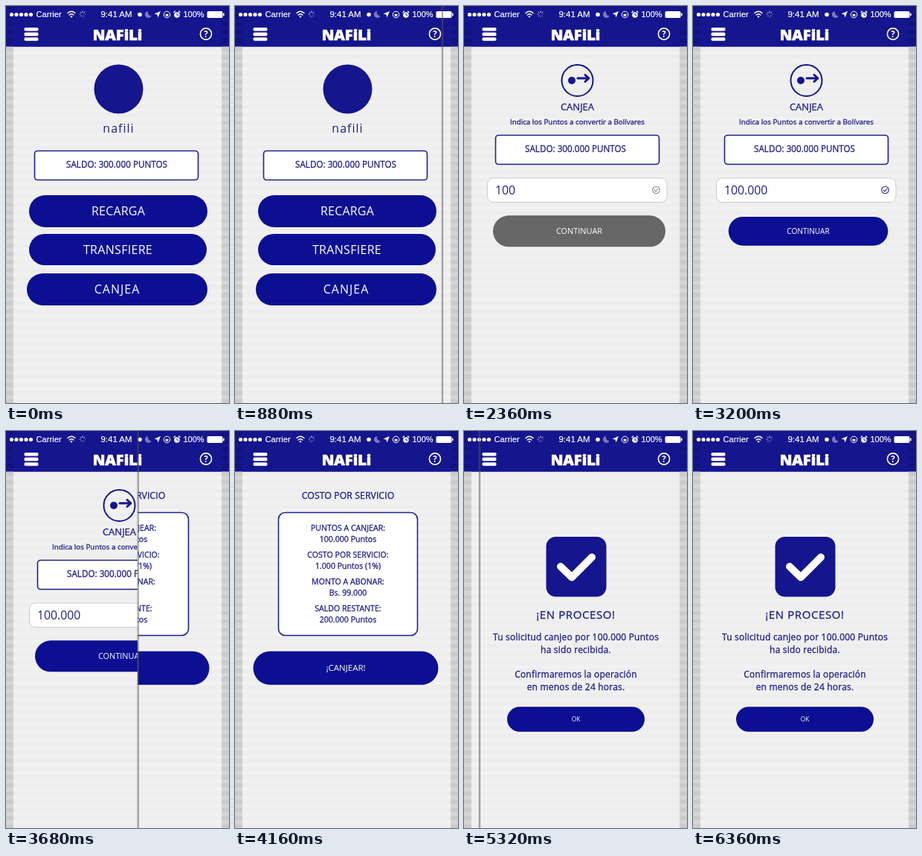
Write an HTML page that moves like this. It is 300 px wide and 533 px high and loops after 6.4 s.

```html
<!DOCTYPE html>
<html lang="es">
<head>
<meta charset="utf-8">
<style>
html, body { margin: 0; width: 100%; height: 100%; overflow: hidden; background: #f0f0f0; }
svg, #edge { position: absolute; left: 0; top: 0; }
text { font-family: "Open Sans", "Noto Sans", sans-serif; font-weight: 500; }
.bold { stroke: #20208a; stroke-width: .3; }
.status { font-family: "Liberation Sans", Arial, sans-serif; stroke: #fff; stroke-width: .2; }
#edge { width: 4px; height: 533px; background: linear-gradient(90deg, #5550, #5555 50%, #555b 75%, #5550); }
</style>
</head>
<body>
<script>
const LOOP = 6400, WIPE = 500, PRESS = 360;
const NAVY = '#15158e', BLUE = '#0c0f92', INK = '#20208a', GREY = '#666';

const text = (s, x, y, size, { fill = INK, gap = 0, anchor = 'middle', extra = '' } = {}) =>
  `<text x="${x}" y="${y}" font-size="${size}" fill="${fill}" letter-spacing="${gap}" text-anchor="${anchor}" ${extra}>${s}</text>`;
const rect = (x, y, w, h, r, fill, extra = '') =>
  `<rect x="${x}" y="${y}" width="${w}" height="${h}" rx="${r}" fill="${fill}" ${extra}/>`;
const circle = (x, y, r, fill, extra = '') =>
  `<circle cx="${x}" cy="${y}" r="${r}" fill="${fill}" ${extra}/>`;
const line = (d, color, width) =>
  `<path d="${d}" fill="none" stroke="${color}" stroke-width="${width}" stroke-linecap="round" stroke-linejoin="round"/>`;
const panel = (x, y, w, h, r) => rect(x, y, w, h, r, '#fff', `stroke="${INK}" stroke-width="1.6"`);
const bold = { extra: 'class="bold"' };

// Buttons are drawn around their own centre so that a press can scale them.
const button = (id, label, x, y, w, h, size, gap = 0) =>
  `<g id="${id}" data-x="${x}" data-y="${y}" transform="translate(${x} ${y})">` +
  rect(-w / 2, -h / 2, w, h, h / 2, BLUE) +
  text(label, 0, size * 0.36, size, { fill: '#fff', gap }) + '</g>';

const svg = (id, body, h = 533) => `<svg id="${id}" width="300" height="${h}">${body}</svg>`;

const stripes = (id, color, band) =>
  `<pattern id="${id}" width="10" height="11" patternUnits="userSpaceOnUse">
    <rect width="10" height="11" fill="${color}"/><rect width="10" height="5.5" fill="${band}"/></pattern>`;
const backdrop = '<defs>' + stripes('side', '#d5d5d5', '#cbcbcb') + stripes('main', '#f1f1f1', '#eee') + '</defs>' +
  rect(0, 0, 300, 533, 0, 'url(#side)') + rect(10, 0, 280, 533, 0, 'url(#main)');

const home = circle(151.5, 111.5, 33, NAVY) +
  text('nafili', 151.5, 170, 16, { gap: 1 }) +
  panel(38.5, 194.5, 220, 39, 4) +
  text('SALDO: 300.000 PUNTOS', 149, 216.5, 11.7, bold) +
  button('recarga', 'RECARGA', 151, 275.5, 240, 43, 16, 0.2) +
  button('transfiere', 'TRANSFIERE', 150.5, 327, 239, 42, 16, 0.3) +
  button('canjea', 'CANJEA', 149.5, 380.5, 243, 43, 16, 1);

const amount = circle(152.5, 100, 21, 'none', `stroke="${NAVY}" stroke-width="2"`) +
  circle(145, 100, 5, NAVY) +
  line('M153 97H167M163 92.5L168 97L163 101.5', NAVY, 3) +
  text('CANJEA', 152.5, 140, 13, bold) +
  text('Indica los Puntos a convertir a Bolívares', 152.5, 158.5, 9.8, bold) +
  panel(42.5, 173.5, 220, 39, 4) +
  text('SALDO: 300.000 PUNTOS', 150, 195.5, 11.7, bold) +
  rect(31.5, 231, 241.5, 32.5, 8, '#fff', 'stroke="#ccc"') +
  text('MONTO', 42, 253.5, 16.7, { fill: '#999', anchor: 'start', extra: 'id="hint" style="font-weight:300"' }) +
  text('', 42, 253, 15.8, { anchor: 'start', extra: 'id="typed"' }) +
  '<g id="tick" fill="none" stroke-width="1.1"><circle cx="258.5" cy="247" r="4.8"/><path d="M256 247l2 2 3.2-3.6"/></g>' +
  button('continuar', 'CONTINUAR', 155, 302.3, 232, 42, 10.9);

const costs = [
  ['PUNTOS A CANJEAR:', 134], ['100.000 Puntos', 149],
  ['COSTO POR SERVICIO:', 170], ['1.000 Puntos (1%)', 185],
  ['MONTO A ABONAR:', 206], ['Bs. 99.000', 220.5],
  ['SALDO RESTANTE:', 241.5], ['200.000 Puntos', 256.5]];
const cost = text('COSTO POR SERVICIO', 152, 91, 12.4, bold) +
  panel(58.5, 109.5, 187, 165, 9) +
  costs.map(([s, y]) => text(s, 152, y, 10.6, bold)).join('') +
  button('canjear', '¡CANJEAR!', 149, 318.3, 249, 45, 11.5);

const notes = [
  ['Tu solicitud canjeo por 100.000 Puntos', 281], ['ha sido recibida.', 297.5],
  ['Confirmaremos la operación', 331], ['en menos de 24 horas.', 347.5]];
const done = rect(110.5, 142, 81, 80.5, 13, NAVY) +
  line('M130 182L145 196.5L172 169.5', '#fff', 10) +
  text('¡EN PROCESO!', 150.5, 252, 15, { gap: 0.6, ...bold }) +
  notes.map(([s, y]) => text(s, 150.5, y, 12, { gap: 0.2, ...bold })).join('') +
  button('ok', 'OK', 150.5, 387, 185, 33.5, 8.3);

const status = (s, x, size, anchor = 'start') =>
  text(s, x, 15.3, size, { fill: '#fff', anchor, extra: 'class="status"' });
const spokes = [...Array(8)].map((_, i) => {
  const a = i * Math.PI / 4, c = Math.cos(a), s = Math.sin(a);
  return `<path d="M${103 + 2 * c} ${11 + 2 * s}L${103 + 4.5 * c} ${11 + 4.5 * s}" stroke="#fff" opacity="${0.25 + i * 0.09}"/>`;
}).join('');
const header = '<defs>' + stripes('rim', '#15158e', '#121280') + '</defs>' +
  rect(0, 0, 300, 54.5, 0, 'url(#rim)') + rect(10, 0, 280, 54.5, 0, NAVY) +
  [7.5, 14, 20.5, 27, 33.5].map(x => circle(x, 11.5, 2.6, '#fff')).join('') +
  status('Carrier', 40.5, 11.2) +
  line('M83 9.5Q88 5 93 9.5M85.2 12Q88 9.5 90.8 12', '#fff', 1.5) + circle(88, 14.3, 1.2, '#fff') +
  spokes +
  status('9:41 AM', 148.5, 11.5, 'middle') +
  circle(180, 11.5, 2.8, '#fff') +
  '<path d="M191 7a4.5 4.5 0 1 0 4.5 6.5a5 5 0 0 1-4.5-6.5" fill="#7777c4"/>' +
  '<path d="M208 7l-3.5 8.5-1-4-4-1z" fill="#fff"/>' +
  circle(216.5, 11.5, 4.3, 'none', 'stroke="#fff"') + rect(214.7, 10.8, 3.6, 3, 0.4, '#fff') +
  circle(230, 12, 3.8, '#fff') + line('M226 8.5l1.5-1.5M234 8.5l-1.5-1.5', '#fff', 1.3) +
  line('M230 10V12.3H232', NAVY, 0.9) +
  status('100%', 238.5, 11) +
  rect(270.5, 7, 21, 9, 1.8, '#fff') + rect(292, 9.5, 1.6, 4, 0.8, '#fff') +
  [29, 35.6, 42.2].map(y => rect(24.5, y, 19, 4.6, 1.8, '#fff')).join('') +
  text('NAFiLi', 150, 45.5, 20, { fill: '#fff', extra: 'style="font-weight:800" stroke="#fff" stroke-width=".7"' }) +
  circle(269, 37.5, 7.6, 'none', 'stroke="#fff" stroke-width="1.6"') +
  text('?', 269, 41.8, 11.5, { fill: '#fff', extra: 'style="font-weight:700"' });

const screens = { home, amount, cost, done };
document.body.innerHTML =
  Object.entries(screens).map(([id, body]) => svg(id, backdrop + body)).join('') +
  svg('header', header, 55) + '<div id="edge"></div>';

const $ = id => document.getElementById(id);
const wipes = [['amount', 795], ['cost', 3460], ['done', 4905]];
const presses = [['canjea', 440], ['continuar', 3125], ['canjear', 4565], ['ok', 5960]];

function draw(t) {
  let edge = -10;
  for (const [id, start] of wipes) {
    const p = Math.min(1, Math.max(0, (t - start) / WIPE));
    const x = 150 * (1 + Math.cos(Math.PI * p));
    $(id).style.clipPath = `inset(0 0 0 ${x}px)`;
    if (p > 0 && p < 1) edge = x;
  }
  $('edge').style.transform = `translateX(${edge - 2}px)`;

  for (const [id, start] of presses) {
    const p = Math.min(1, Math.max(0, (t - start) / PRESS));
    const { x, y } = $(id).dataset;
    $(id).setAttribute('transform', `translate(${x} ${y}) scale(${1 - 0.122 * Math.sin(Math.PI * p)})`);
  }

  const count = Math.max(0, Math.floor((t - 2020) / 90));
  $('typed').textContent = '100.000'.slice(0, count);
  $('hint').style.display = count ? 'none' : '';
  const ready = t >= 2780;
  $('continuar').firstChild.setAttribute('fill', ready ? BLUE : GREY);
  $('tick').setAttribute('stroke', ready ? INK : '#888');
}

const begin = performance.now();
function tick() {
  draw((performance.now() - begin) % LOOP);
  requestAnimationFrame(tick);
}
tick();
</script>
</body>
</html>
```
